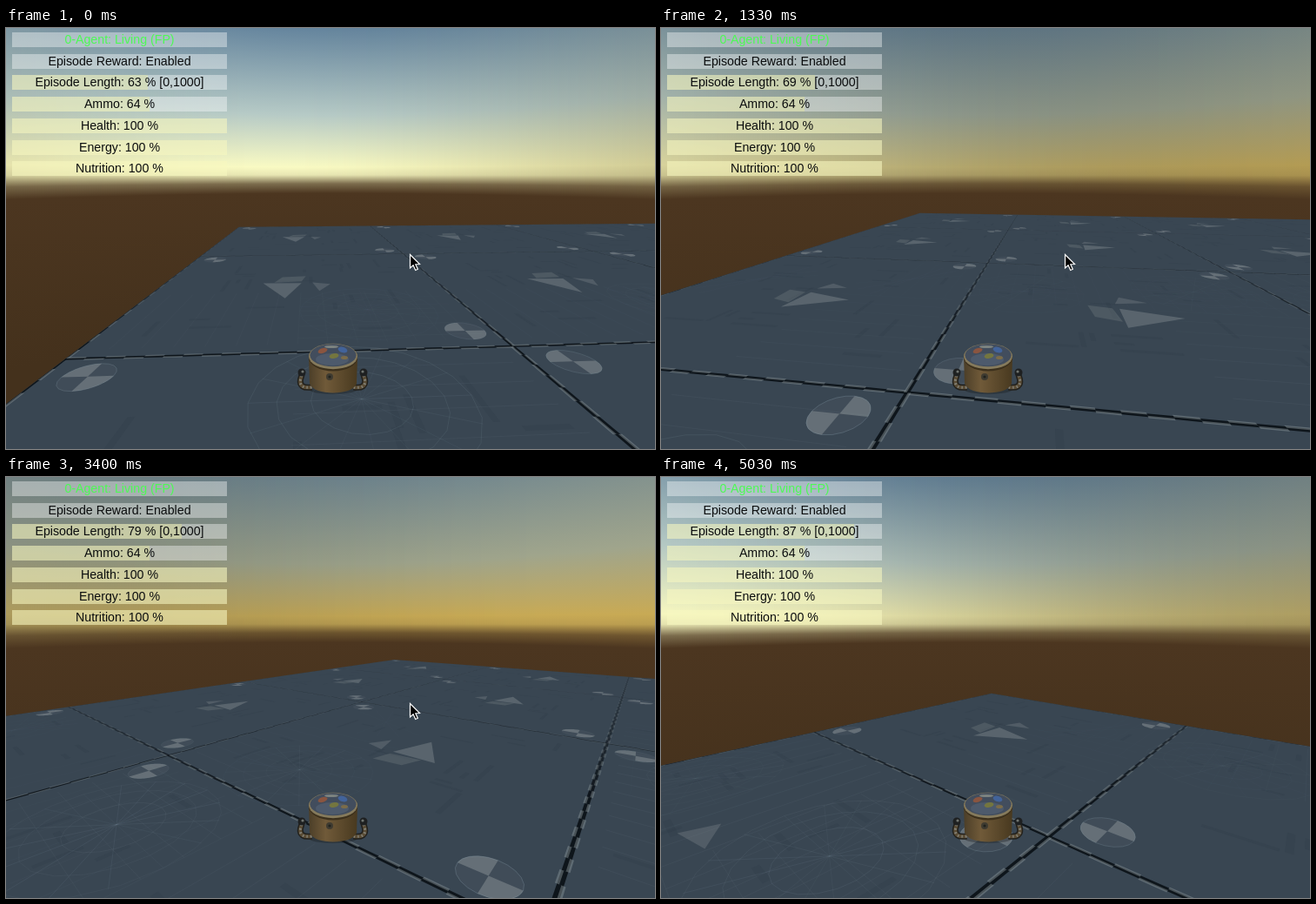
Recreate the animation shown at these times as an HTML page with a canvas. Size 746 px wide and 484 px high, loop 5130 ms.

```html
<!DOCTYPE html>
<html lang="en">
<head>
<meta charset="utf-8">
<title>Agent arena</title>
<style>
html, body { margin: 0; width: 100%; height: 100%; overflow: hidden; background: #394652; }
#stage { position: relative; width: 746px; height: 484px; overflow: hidden; }
canvas { display: block; }
.bar {
  position: absolute; left: 7px; width: 247px; height: 17px;
  background: rgba(255, 255, 255, .38);
  font: 14.2px/17px "Liberation Sans", Arial, sans-serif;
  text-align: center; color: #0b0d0e; white-space: pre;
}
.bar i { position: absolute; left: 0; top: 0; height: 100%; background: rgba(238, 240, 140, .32); }
.bar span { position: relative; }
.bar.title { color: #4dfa55; }
</style>
</head>
<body>
<div id="stage"><canvas id="view" width="746" height="484"></canvas></div>
<script>
const W = 746, H = 484, LOOP = 5130, STEP = 147, LAST = 34;
const CX = 373, HORIZON = 168, FOCAL = 425.5, DROP = 170.2, TILT = 0.069;
const ARENA = 4, FOLLOW = 0.612, SUN = -5, NEAR = 0.2, TURN = 2 * Math.PI;

const stage = document.getElementById('stage');
const ctx = document.getElementById('view').getContext('2d');

// Key poses: step, robot x, robot z, heading in degrees
const PATH = [
  [0, .566, 1.846, 3.4], [4, .505, 2.047, 31], [9, 1.025, 2.859, 81.2],
  [17, 2.064, 3.189, 182.4], [23, 2.342, 3.015, 139.5],
  [29, 2.594, 2.954, 65.7], [34, 2.912, 3.08, 48.4]
];

// Sky layers: height, colour towards the sun, colour away from it, dimming at right angles
const SKY = [
  { y: 0, lit: [100, 132, 157], away: [112, 134, 143], dim: .13 },
  { y: 100, lit: [182, 202, 198], away: [160, 165, 140], dim: .18 },
  { y: 160, lit: [249, 250, 195], away: [200, 170, 85], dim: .2 }
];
const SOIL = [76, 54, 32], DEEP_SOIL = [68, 49, 28];

const mix = (a, b, s) => a.map((v, i) => v + (b[i] - v) * s);
const rgb = c => `rgb(${c.map(Math.round)})`;
const radians = deg => deg * Math.PI / 180;

function seeded(s) {
  return () => (s = (s * 16807) % 2147483647) / 2147483647;
}
const rnd = seeded(41);
const SCUFFS = Array.from({ length: 26 }, () => {
  const flat = rnd() < .5, len = .04 + rnd() * .1;
  return { x: .08 + rnd() * .8, z: .08 + rnd() * .8, w: flat ? len : .012, d: flat ? .012 : len };
});

// Smooth curve through the key poses, level where a value turns back
const slope = (i, c) => (PATH[i + 1][c] - PATH[i][c]) / (PATH[i + 1][0] - PATH[i][0]);

function tangent(i, c) {
  const a = slope(Math.max(i - 1, 0), c), b = slope(Math.min(i, PATH.length - 2), c);
  return a * b <= 0 ? 0 : (a + b) / 2;
}

function along(step, c) {
  let i = 0;
  while (i < PATH.length - 2 && step >= PATH[i + 1][0]) i++;
  const p = PATH[i], q = PATH[i + 1], d = q[0] - p[0];
  const s = (step - p[0]) / d, s2 = s * s, s3 = s2 * s;
  return (2 * s3 - 3 * s2 + 1) * p[c] + (s3 - 2 * s2 + s) * d * tangent(i, c) +
    (3 * s2 - 2 * s3) * q[c] + (s3 - s2) * d * tangent(i + 1, c);
}

let cam;
function setCamera(step) {
  const deg = along(step, 3), sin = Math.sin(radians(deg)), cos = Math.cos(radians(deg));
  cam = { deg, sin, cos, x: along(step, 1) - FOLLOW * sin, z: along(step, 2) - FOLLOW * cos };
}

function toCam([x, z]) {
  const dx = x - cam.x, dz = z - cam.z;
  return [dx * cam.cos - dz * cam.sin, dx * cam.sin + dz * cam.cos];
}

function toScreen([x, z]) {
  const d = z + TILT;
  return [CX + FOCAL * x / d, HORIZON + DROP / d];
}

function clipNear(pts) {
  const out = [];
  pts.forEach((p, i) => {
    const q = pts[(i + 1) % pts.length];
    if (p[1] >= NEAR) out.push(p);
    if ((p[1] < NEAR) !== (q[1] < NEAR)) {
      const s = (NEAR - p[1]) / (q[1] - p[1]);
      out.push([p[0] + (q[0] - p[0]) * s, NEAR]);
    }
  });
  return out;
}

function trace(pts) {
  ctx.beginPath();
  pts.forEach((p, i) => i ? ctx.lineTo(p[0], p[1]) : ctx.moveTo(p[0], p[1]));
}

function ground(pts, fill) {
  const c = clipNear(pts.map(toCam));
  if (c.length < 3) return;
  trace(c.map(toScreen));
  ctx.fillStyle = fill;
  ctx.fill();
}

function slab(x, z, w, d, fill) {
  ground([[x, z], [x + w, z], [x + w, z + d], [x, z + d]], fill);
}

// Thin floor line that fades with distance
function scratch(pts, strength) {
  const c = pts.map(toCam);
  if (c.some(p => p[1] < NEAR)) return;
  const fade = strength * Math.min(1, Math.pow(.62 / c[0][1], 2.5));
  if (fade < .015) return;
  trace(c.map(toScreen));
  ctx.strokeStyle = `rgba(140,160,172,${fade})`;
  ctx.stroke();
}

function arc(x, z, r, from = 0, to = TURN) {
  return Array.from({ length: 21 }, (_, i) => {
    const a = from + (to - from) * i / 20;
    return [x + r * Math.cos(a), z + r * Math.sin(a)];
  });
}

function drawSky() {
  const width = 2;
  for (let x = 0; x < W; x += width) {
    const dx = (x + width / 2 - CX) / FOCAL, k = Math.hypot(1, dx);
    const angle = radians(cam.deg - SUN) + Math.atan(dx);
    const sun = Math.pow((1 + Math.cos(angle)) / 2, 1.4), side = Math.sin(angle) ** 2;
    const g = ctx.createLinearGradient(0, HORIZON - HORIZON * k, 0, HORIZON + (H - HORIZON) * k);
    const stop = (y, c) => g.addColorStop(y / H, rgb(c));
    let c;
    for (const { y, lit, away, dim } of SKY) {
      c = mix(away, lit, sun).map(v => v * (1 - dim * side));
      stop(y, c);
    }
    stop(169, mix(SOIL, c, .9));
    stop(179, mix(SOIL, c, .28));
    stop(190, SOIL);
    stop(340, DEEP_SOIL);
    ctx.fillStyle = g;
    ctx.fillRect(x, 0, width, H);
  }
}

function drawMark(x, z) {
  const r = .05, q = TURN / 4;
  ground(arc(x, z, r), 'rgba(160,175,182,.06)');
  for (const a of [q, 3 * q]) ground([[x, z], ...arc(x, z, r, a, a + q)], 'rgba(185,192,188,.3)');
  scratch(arc(x, z, r), .3);
}

function drawWheel(x, z) {
  for (const r of [.09, .15, .2]) scratch(arc(x, z, r), .12);
  for (let i = 0; i < 8; i++) {
    const [a, b] = [0, Math.PI].map(h => arc(x, z, .2, h + i * Math.PI / 8)[0]);
    scratch([a, b], .1);
  }
}

function drawShards(x, z) {
  const shard = (alpha, ...pts) =>
    ground(pts.map(p => [x + p[0], z + p[1]]), `rgba(175,182,180,${alpha})`);
  shard(.17, [.515, .62], [.425, .61], [.4, .54], [.5, .55]);
  shard(.27, [.36, .535], [.5, .53], [.45, .365]);
  shard(.2, [.54, .535], [.605, .512], [.563, .435]);
}

function drawTile(x, z) {
  for (const s of SCUFFS) slab(x + s.x, z + s.z, s.w, s.d, 'rgba(38,50,62,.16)');
  for (let o = 1 / 14; o < .95; o += 1 / 14) {
    scratch([[x + o, z + .04], [x + o, z + .42]], .07);
    scratch([[x + .5, z + o], [x + .96, z + o]], .07);
  }
  drawWheel(x + .62, z + .82);
  drawWheel(x + .7, z + .25);
  drawShards(x, z);
  drawMark(x + .09, z + .925);
  drawMark(x + .925, z + .09);
}

// Dark joint with light dashes on alternating sides
function drawSeams() {
  const w = .009, len = 1 / 24;
  for (let k = 0; k <= ARENA; k++) {
    for (const across of [false, true]) {
      const piece = (side, start, wide, fill) =>
        across ? slab(start, k + side, len, wide, fill) : slab(k + side, start, wide, len, fill);
      for (let i = 0; i < ARENA / len; i++) {
        const at = i * len, z = toCam(across ? [at, k] : [k, at])[1];
        if (z < 0) continue;
        const fade = Math.min(1, Math.pow(.8 / z, 1.2));
        piece(-w / 2, at, w, `rgba(8,13,18,${.85 * fade})`);
        piece(i % 2 ? -w * .8 : w * .15, at, w * .65, `rgba(140,152,155,${.45 * fade})`);
      }
    }
  }
}

function drawFloor() {
  const corners = [[0, 0], [ARENA, 0], [ARENA, ARENA], [0, ARENA]];
  ground(corners, '#394652');
  ctx.save();
  trace(clipNear(corners.map(toCam)).map(toScreen));
  ctx.clip();
  ctx.lineWidth = 1;
  for (let x = 0; x < ARENA; x++) for (let z = 0; z < ARENA; z++) drawTile(x, z);
  drawSeams();
  ctx.restore();
}

function oval(x, y, rx, ry, fill, turn = 0) {
  ctx.beginPath();
  ctx.ellipse(x, y, rx, ry, turn, 0, TURN);
  ctx.fillStyle = fill;
  ctx.fill();
}

function drawArm(side) {
  ctx.save();
  ctx.translate(375.5, 0);
  ctx.scale(side, 1);
  const hook = (width, color, dash = []) => {
    ctx.beginPath();
    ctx.moveTo(24, 413);
    ctx.quadraticCurveTo(39, 415, 37, 404);
    ctx.lineTo(35, 397);
    ctx.lineWidth = width;
    ctx.strokeStyle = color;
    ctx.setLineDash(dash);
    ctx.stroke();
  };
  hook(7, '#22211d');
  hook(4, '#5a4c35');
  hook(3, '#85847b', [1.5, 3]);
  oval(35.5, 396, 4.5, 4.5, '#1e2021');
  oval(34.5, 395, 1.6, 1.6, '#6f736f');
  ctx.restore();
}

function drawRobot() {
  oval(376, 416, 27, 5, 'rgba(20,24,26,.35)');
  drawArm(-1);
  drawArm(1);
  const body = ctx.createLinearGradient(348, 0, 404, 0);
  body.addColorStop(0, '#4b3e28');
  body.addColorStop(.35, '#705a39');
  body.addColorStop(1, '#48391f');
  ctx.beginPath();
  ctx.moveTo(348, 378);
  ctx.lineTo(349, 409);
  ctx.bezierCurveTo(354, 423, 398, 423, 403, 409);
  ctx.lineTo(404, 378);
  ctx.fillStyle = body;
  ctx.fill();
  oval(372, 401, 4, 4, '#3f3b30');
  oval(372, 401, 1.6, 1.6, '#20221f');
  oval(376, 379, 28, 15.5, '#3c301c');
  oval(376, 377.5, 28, 14.7, '#857a5c');
  oval(376, 376.3, 26.5, 13, '#424d5d');
  oval(375, 381, 19, 7, '#4d5a6c');
  oval(364, 371, 5.5, 2.8, '#8a5540', -.3);
  oval(387, 370, 5.5, 3.2, '#42639a', .3);
  oval(377, 377, 5.5, 2.8, '#74763f', -.2);
  oval(389, 379, 4, 2, '#7b6c49');
  oval(374, 366.5, 8, 1.6, '#7c8380');
}

// The pointer rests, then leaves towards the lower right
function drawCursor(step) {
  const s = Math.max(0, (step - 27) / 2);
  if (s > 1.7) return;
  ctx.save();
  ctx.translate(464.5 + 142 * s, 260.5 + 141 * s);
  trace([[0, 0], [0, 15.5], [3.6, 12.2], [6.2, 18], [8.8, 16.8], [6.3, 11.2], [11, 11]]);
  ctx.closePath();
  ctx.fillStyle = '#000';
  ctx.fill();
  ctx.lineWidth = 1.2;
  ctx.strokeStyle = '#fff';
  ctx.stroke();
  ctx.restore();
}

const bars = ['0-Agent: Living (FP)', 'Episode Reward: Enabled', 'Episode Length: 63 % [0,1000]',
  'Ammo: 64 %', 'Health: 100 %', 'Energy: 100 %', 'Nutrition: 100 %'].map((text, i) => {
  const bar = document.createElement('div');
  const level = document.createElement('i'), label = document.createElement('span');
  bar.className = i ? 'bar' : 'bar title';
  bar.style.top = Math.round(5 + i * 24.7) + 'px';
  level.style.width = (/(\d+) %/.exec(text) || [0, 0])[1] + '%';
  label.textContent = text;
  bar.append(level, label);
  stage.append(bar);
  return { level, label };
});

function showLength(step) {
  const pct = Math.floor(63.2 + step * .72);
  bars[2].label.textContent = `Episode Length: ${pct} % [0,1000]`;
  bars[2].level.style.width = pct + '%';
}

function render(step) {
  setCamera(step);
  drawSky();
  drawFloor();
  drawRobot();
  drawCursor(step);
  showLength(step);
}

const start = performance.now();
let shown = -1;
function tick() {
  const t = (performance.now() - start) % LOOP;
  const step = Math.min(LAST, Math.floor(t / STEP));
  if (step !== shown) render(shown = step);
  requestAnimationFrame(tick);
}
tick();
</script>
</body>
</html>
```
